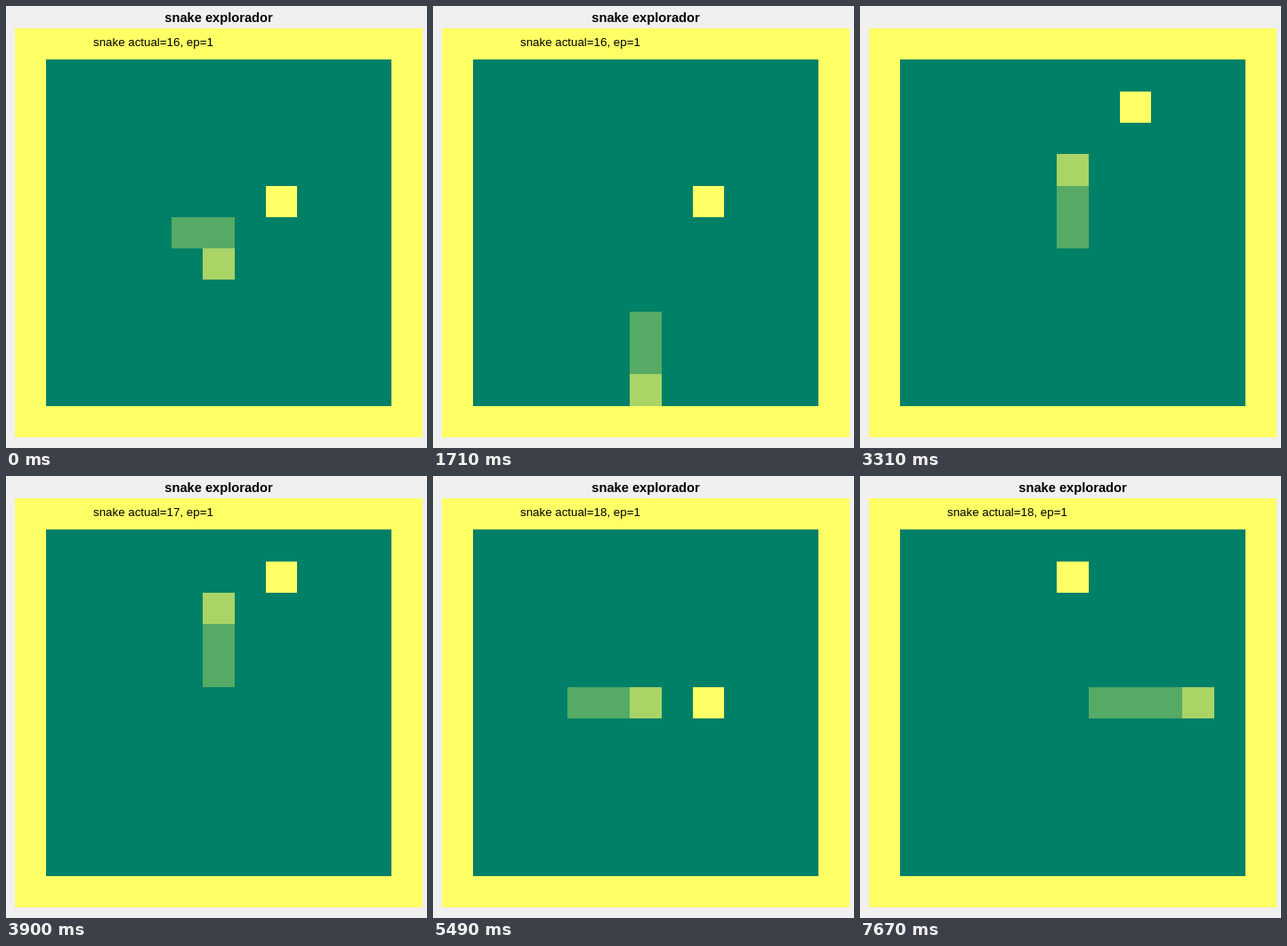
Recreate the animation shown at these times as an HTML page with a canvas. Size 473 by 496 pixels, loop 8 s.

```html
<!DOCTYPE html>
<html lang="es">
<head>
<meta charset="utf-8">
<title>snake explorador</title>
<style>
  html, body { margin: 0; width: 100%; height: 100%; overflow: hidden; background: #f0f0f0; }
  canvas { display: block; }
</style>
</head>
<body>
<canvas id="stage" width="473" height="496"></canvas>
<script>
const ctx = document.getElementById('stage').getContext('2d');
const LOOP = 8000;
const WALL = '#ffff66', FLOOR = '#008066', BODY = '#55aa66', HEAD = '#aad466';

// Each run: tail cell, route from the tail, and the times at which the head advances.
// The first time shows the snake's first three cells.
const runs = [
  { score: 16, food: [8, 5], tail: [5, 6], route: 'RDDDDDD',
    times: [0, 70, 590, 1120, 1710] },
  { score: 17, food: [8, 2], tail: [4, 6], route: 'RRUUUUU',
    times: [2240, 2760, 3310, 3900, 4430, 4960] },
  { score: 18, food: [8, 6], tail: [4, 6], route: 'RRRRRR',
    times: [5490, 6020, 6610, 7140, 7670], eatAt: 2, nextFood: [6, 2] }
];

// Intervals in which the labels are cleared for a redraw.
const blanks = [[2240, 2300], [2760, 2830], [3310, 3370]];

const DIRS = { R: [1, 0], U: [0, -1], D: [0, 1] };
for (const run of runs) {
  run.cells = [run.tail];
  for (const d of run.route) {
    const [x, y] = run.cells.at(-1);
    run.cells.push([x + DIRS[d][0], y + DIRS[d][1]]);
  }
}

const gridX = i => Math.round(10 + i * 458 / 13);
const gridY = i => Math.round(25 + i * 35.3);

function block(x, y, color, w = 1, h = w) {
  ctx.fillStyle = color;
  ctx.fillRect(gridX(x), gridY(y), gridX(x + w) - gridX(x), gridY(y + h) - gridY(y));
}

function label(text, x, y, font, align) {
  ctx.fillStyle = '#000';
  ctx.font = font + ' Arial, "Liberation Sans", sans-serif';
  ctx.textAlign = align;
  ctx.fillText(text, x, y);
}

function draw(t) {
  const run = runs.findLast(r => t >= r.times[0]);
  const step = run.times.findLastIndex(s => t >= s);
  const ate = step >= run.eatAt;
  const head = step + 2;
  const snake = run.cells.slice(head - (ate ? 3 : 2), head + 1);

  ctx.fillStyle = '#f0f0f0';
  ctx.fillRect(0, 0, 473, 496);
  block(0, 0, WALL, 13);
  block(1, 1, FLOOR, 11);
  block(...(ate ? run.nextFood : run.food), WALL);
  snake.forEach(([x, y], i) => block(x, y, i === snake.length - 1 ? HEAD : BODY));

  if (!blanks.some(([from, to]) => t >= from && t < to)) {
    label('snake explorador', 239, 18, 'bold 14.67px', 'center');
    label(`snake actual=${run.score}, ep=1`, 98, 45, '13.33px', 'left');
  }
}

const start = performance.now();
function tick() {
  draw((performance.now() - start) % LOOP);
  requestAnimationFrame(tick);
}
tick();
</script>
</body>
</html>
```
